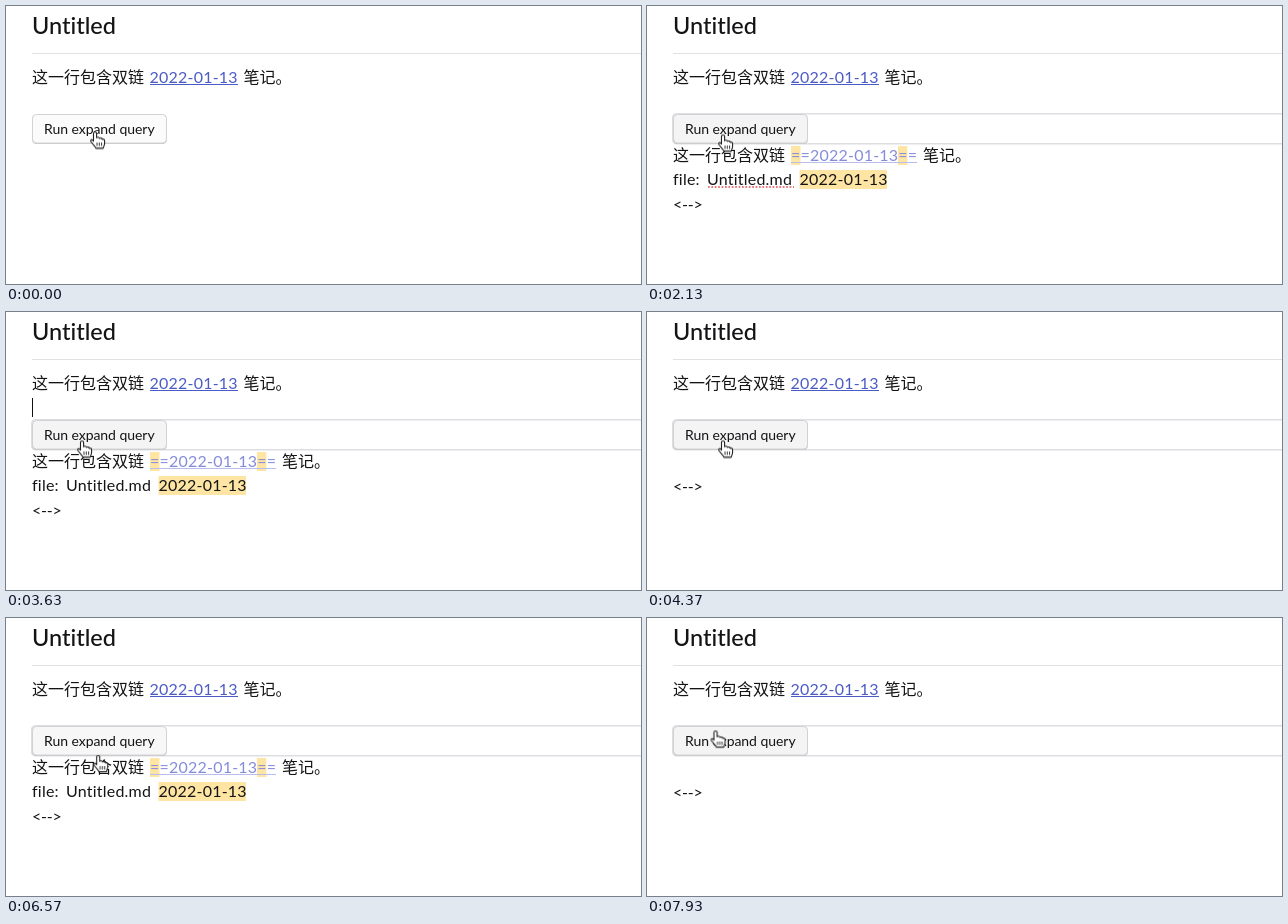
These frames come from a looping animation (635 by 278 pixels, 8000 ms). An HTML page:

```html
<!DOCTYPE html>
<html lang="zh-CN">
<head>
<meta charset="utf-8">
<title>Expand query</title>
<style>
html, body { margin: 0; width: 100%; height: 100%; overflow: hidden; background: #fff; }
svg { display: block; width: 635px; height: 278px; }
text { font: 16px Lato, "Noto Sans CJK SC", "Noto Sans CJK", sans-serif; font-variant-ligatures: none; letter-spacing: .22px; fill: #141416; white-space: pre; }
.zh { letter-spacing: 0; font-weight: 500; }
.title { font-size: 23.5px; letter-spacing: 0; font-weight: 500; }
.label { font-size: 14px; letter-spacing: -.05px; }
.arrow { letter-spacing: -.2px; }
.link { fill: #4b5bc6; }
.soft { fill: #858cda; }
.mark { fill: #fee5a3; }

#box, #out, #first, #arrow, #caret, #spell, #hand, #beam, #button { animation: 8s step-end infinite; }
#box { animation-name: box; }
#out { animation-name: out; }
#first { animation-name: first; }
#arrow { animation-name: arrow; }
#caret { animation-name: caret; }
#spell { animation-name: spell; }
#hand { animation-name: hand; }
#beam { animation-name: beam; }
#button { animation-name: button; }
#pointer { animation: move 8s linear infinite; }

@keyframes box {
  0%, 17.12%, 83% { visibility: hidden; }
  .8%, 19.2%, 91.87% { visibility: visible; }
}
@keyframes button {
  0% { fill: #fbfbfb; }
  .8%, 91.87% { fill: #f4f4f5; }
  81% { fill: #f7f7f8; }
}
@keyframes first {
  0%, 6.24% { visibility: hidden; }
  5.37% { visibility: visible; }
}
@keyframes arrow {
  0%, 10.37%, 32.12%, 45.37%, 58.74%, 72.12% { visibility: hidden; }
  6.24%, 27.87%, 41.24%, 54.62%, 67.87%, 99.12% { visibility: visible; }
}
@keyframes out {
  0%, 27.87%, 41.24%, 54.62%, 67.87%, 99.12% { visibility: hidden; }
  10.37%, 32.12%, 45.37%, 58.74%, 72.12% { visibility: visible; }
}
@keyframes caret {
  0%, 16.62%, 26.62%, 38.37%, 51.62%, 64.99%, 78.37%, 90.87%, 98.37% { visibility: hidden; }
  10.37%, 22.87%, 32.12%, 45.37%, 58.74%, 72.12%, 84.62%, 97.12% { visibility: visible; }
}
@keyframes spell {
  0%, 27.87% { visibility: hidden; }
  24.12% { visibility: visible; }
}
@keyframes hand {
  0%, 92% { visibility: visible; }
  83% { visibility: hidden; }
}
@keyframes beam {
  0%, 92% { visibility: hidden; }
  83% { visibility: visible; }
}
@keyframes move {
  0%, .37% { transform: translate(89px, 125.5px); }
  1.25%, 15.87% { transform: translate(78px, 122px); }
  18% { transform: translate(75px, 146px); }
  20.87%, 77.5% { transform: translate(76px, 128.5px); }
  82.12% { transform: translate(92px, 136.5px); }
  84.4% { transform: translate(116px, 212px); }
  86% { transform: translate(132px, 262px); }
  87.5%, 89.12% { transform: translate(130px, 264px); }
  91.7% { transform: translate(88px, 146px); }
  93.37%, 100% { transform: translate(68.5px, 112.5px); }
}
</style>
</head>
<body>
<svg viewBox="0 0 635 278">
  <text class="title" x="26" y="28">Untitled</text>
  <path d="M26 47.5H635" stroke="#e1e1e1"/>

  <text class="zh" x="26" y="77">这一行包含双链</text>
  <text class="link" x="143.5" y="77">2022-01-13</text>
  <path d="M144 78.5H232" stroke="#4b5bc6"/>
  <text class="zh" x="237.5" y="77">笔记。</text>

  <rect id="box" x="25.75" y="107.75" width="620" height="30" rx="4" fill="none" stroke="#dddee2" stroke-width="1.6"/>
  <rect x="26" y="109" width="135" height="29" rx="4.5" fill="#c9c9cc"/>
  <rect id="button" x="26.5" y="108.5" width="134" height="28.5" rx="4" stroke="#d2d2d5"/>
  <text class="label" x="38" y="128">Run expand query</text>

  <text id="first" class="arrow" x="26" y="155">&lt;--&gt;</text>
  <text id="arrow" class="arrow" x="26" y="180">&lt;--&gt;</text>

  <g id="out">
    <path class="mark" d="M144 140h9.5v19h-9.5zM251 140h9.3v19h-9.3zM152.5 164H240v19h-87.5z"/>
    <text class="zh" x="26" y="155">这一行包含双链</text>
    <text class="soft" x="144" y="155">==2022-01-13==</text>
    <path d="M144 156.5H270" stroke="#b9bdeb"/>
    <text class="zh" x="276" y="155">笔记。</text>
    <text x="26" y="179">file:</text>
    <text x="60" y="179">Untitled.md</text>
    <text x="152.5" y="179">2022-01-13</text>
    <text class="arrow" x="26" y="204">&lt;--&gt;</text>
  </g>
  <path id="spell" d="M61 181H147" stroke="#e5484d" stroke-width="1.7" stroke-dasharray="1.7 1.7"/>
  <path id="caret" d="M26.5 86V105" stroke="#111"/>

  <g id="pointer">
    <g id="hand" stroke="#222" stroke-width="1.1" stroke-linejoin="round">
      <path fill="#fff" d="M0 .5C1 .5 1.6 1.1 1.6 2V6.2C2.2 5.4 4.3 5.5 4.5 7C5.2 6.2 7.1 6.5 7.3 7.9C8.2 7.3 9.6 7.7 9.6 9.3V11.8C9.6 13.8 8.6 14.8 8.3 16.6H.8C.3 14.8-2.2 12.8-3.8 10.5C-5 8.6-3.4 7.6-2.3 8.6L-1.5 9.6V2C-1.5 1.1-1 .5 0 .5Z"/>
      <path fill="none" stroke-width=".9" d="M2 11V14.5M4.3 11V14.5M6.6 11V14.5"/>
    </g>
    <path id="beam" fill="none" stroke="#222" d="M-3-8.5Q0-8.5 0-6.5Q0-8.5 3-8.5M0-6.5V6.5M-3 8.5Q0 8.5 0 6.5Q0 8.5 3 8.5"/>
  </g>
</svg>
</body>
</html>
```
